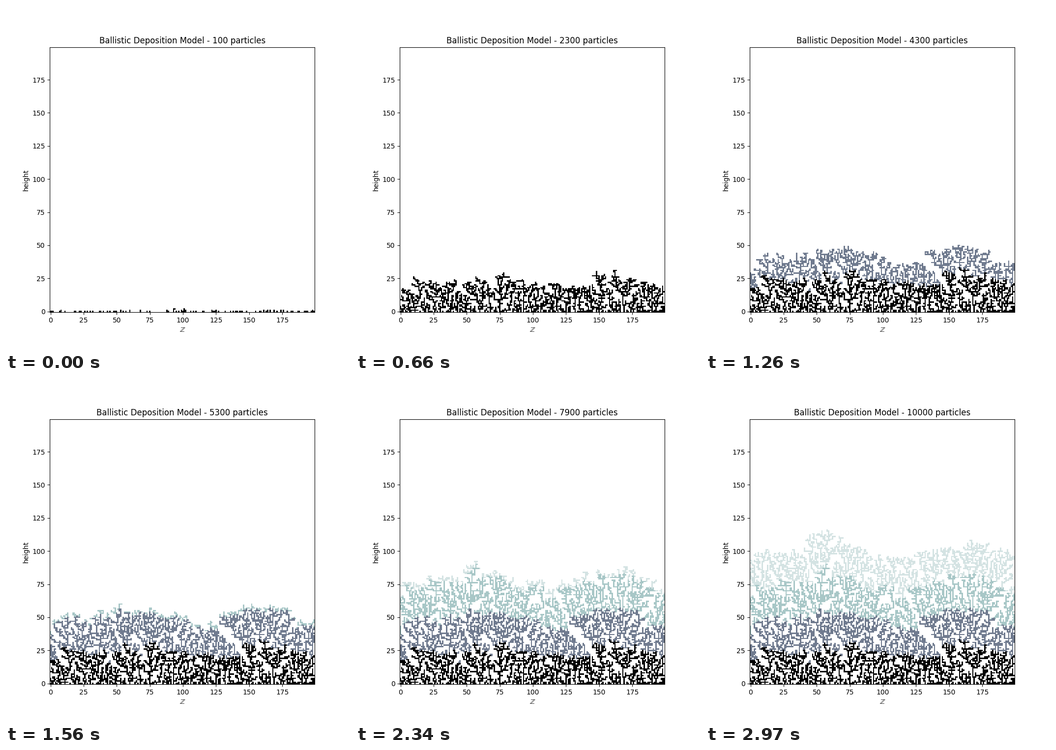
Animation, 700 px wide and 700 px high, one loop 3000 ms. Source, as a matplotlib script:

```python
import numpy as np
import matplotlib.pyplot as plt
from matplotlib.animation import FuncAnimation

SIZE = 200
FRAMES = 100
PER_FRAME = 100
TOTAL = FRAMES * PER_FRAME
LAYERS = 4


def deposit(seed):
    """Return, for each cell, the index of the particle that landed there."""
    rng = np.random.default_rng(seed)
    birth = np.full((SIZE, SIZE), TOTAL)
    height = np.zeros(SIZE + 2, dtype=int)  # one spare column on each side
    for n, x in enumerate(rng.integers(SIZE, size=TOTAL)):
        # A particle sticks to the first neighbour it touches
        y = max(height[x] - 1, height[x + 1], height[x + 2] - 1)
        if y < SIZE:
            birth[y, x] = n
            height[x + 1] = y + 1
    return birth


birth = deposit(seed=7)
# Each layer is halfway between the previous shade and white
layer = birth * LAYERS // TOTAL
shades = np.where(layer < LAYERS, 1 - 0.5 ** layer, 1)

fig, ax = plt.subplots(figsize=(7, 7), dpi=100)
image = ax.imshow(np.ones((SIZE, SIZE)), cmap="bone", vmin=0, vmax=1,
                  origin="lower", interpolation="nearest")
ax.set_xlabel(r"$\mathbb{Z}$")
ax.set_ylabel("height")
title = ax.set_title("")


def update(frame):
    count = (frame + 1) * PER_FRAME
    image.set_data(np.where(birth < count, shades, 1))
    title.set_text(f"Ballistic Deposition Model - {count} particles")
    return image, title


anim = FuncAnimation(fig, update, frames=FRAMES, interval=30, repeat=True)
plt.show()
```
